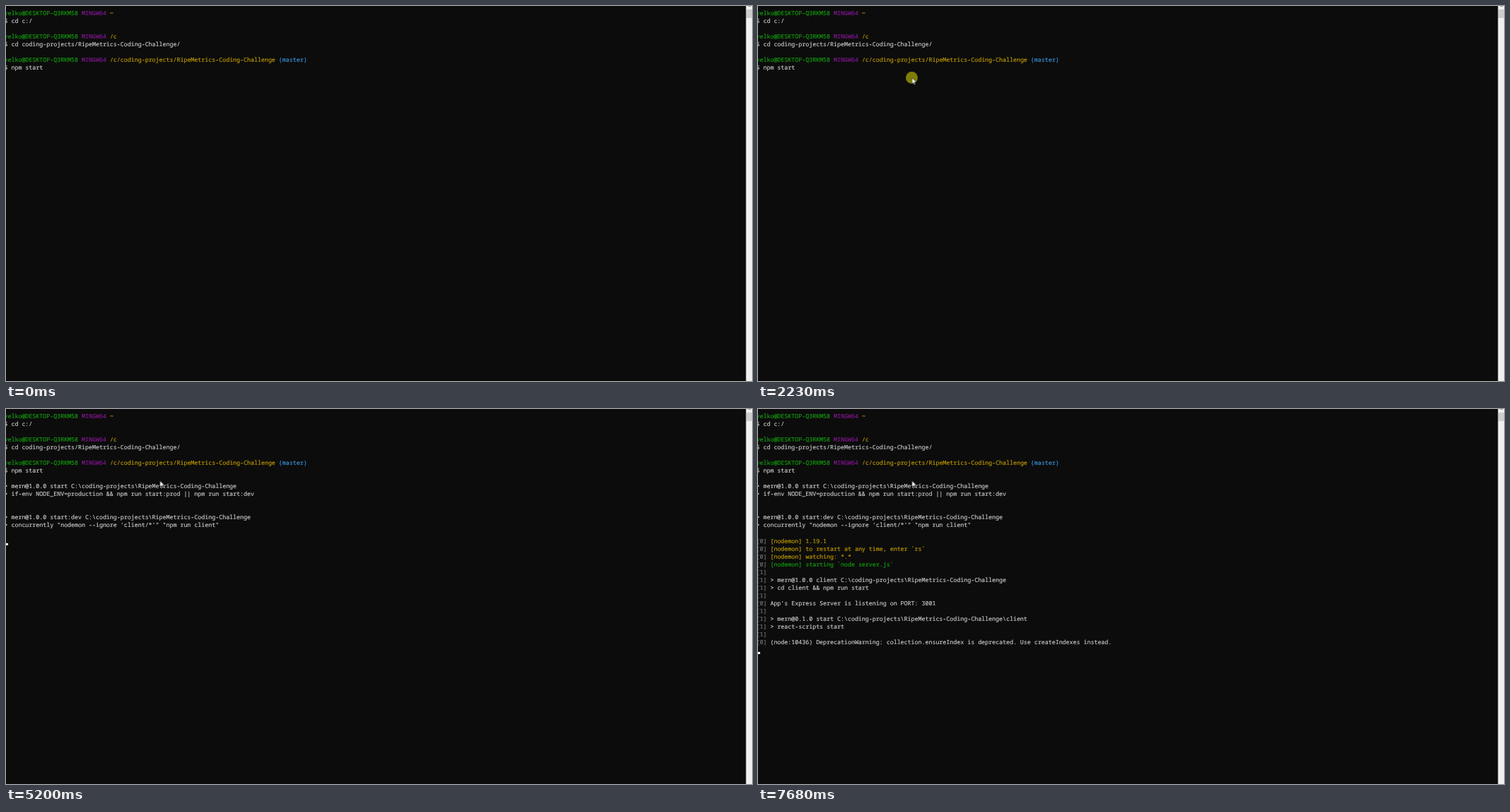
Animation, 1055 px wide and 531 px high, one loop 8000 ms. Source, as an HTML page:

```html
<!DOCTYPE html>
<html lang="en">
<head>
<meta charset="utf-8">
<title>Terminal</title>
<style>
  html, body { margin: 0; width: 100%; height: 100%; overflow: hidden; background: #0c0c0c; }
  body { position: relative; }

  #term {
    position: absolute; left: -2.5px; top: 4.8px;
    font: 8.3px/11.05px "Noto Sans Mono", monospace;
    text-rendering: geometricPrecision;
    -webkit-text-stroke: .15px;
    color: #ccc;
  }
  #term > div { white-space: pre; }
  .script { padding: 11.05px 0; }
  .g { color: #13a10e; }
  .m { color: #881798; }
  .y { color: #c19c00; }
  .b { color: #3a96dd; }
  .d { color: #767676; }

  .out, #caret, #click { animation: 8s step-end infinite; }
  .at4500 { animation-name: at4500; }
  .at5200 { animation-name: at5200; }
  .at5910 { animation-name: at5910; }
  .at6230 { animation-name: at6230; }
  .at6610 { animation-name: at6610; }
  .at6920 { animation-name: at6920; }
  .at7680 { animation-name: at7680; }
  @keyframes at4500 { 0% { opacity: 0 } 56.25%, 100% { opacity: 1 } }
  @keyframes at5200 { 0% { opacity: 0 } 65%, 100% { opacity: 1 } }
  @keyframes at5910 { 0% { opacity: 0 } 73.875%, 100% { opacity: 1 } }
  @keyframes at6230 { 0% { opacity: 0 } 77.875%, 100% { opacity: 1 } }
  @keyframes at6610 { 0% { opacity: 0 } 82.625%, 100% { opacity: 1 } }
  @keyframes at6920 { 0% { opacity: 0 } 86.5%, 100% { opacity: 1 } }
  @keyframes at7680 { 0% { opacity: 0 } 96%, 100% { opacity: 1 } }

  /* 1em is one terminal row */
  #caret {
    position: absolute; margin-top: 12.85px;
    width: 5px; height: 2.76px; font-size: 11.05px;
    background: #fff;
    animation-name: caret;
  }
  @keyframes caret {
    0%      { left: 52.3px; top: 7em; opacity: 0 }
    34.75%  { left: 52.3px; top: 7em; opacity: 1 }
    41.625% { left: 52.3px; top: 7em; opacity: 0 }
    46.375% { left: -2.4px; top: 8em; opacity: 1 }
    47.5%   { left: -2.4px; top: 8em; opacity: 0 }
    54.375% { left: -2.4px; top: 8em; opacity: 1 }
    56.25%  { left: -2.4px; top: 12em; opacity: 1 }
    65%     { left: -2.4px; top: 16em; opacity: 1 }
    73.875% { left: -2.4px; top: 20em; opacity: 1 }
    77.875% { left: -2.4px; top: 24em; opacity: 1 }
    82.625% { left: -2.4px; top: 24em; opacity: 0 }
    83.625% { left: -2.4px; top: 25em; opacity: 1 }
    86.5%   { left: -2.4px; top: 29em; opacity: 1 }
    94.125% { left: -2.4px; top: 29em; opacity: 0 }
    96%, 100% { left: -2.4px; top: 30em; opacity: 1 }
  }

  #click {
    position: absolute; left: 209px; top: 93px; width: 17px; height: 17px;
    border-radius: 50%; background: rgba(255, 255, 0, .47);
    animation-name: click;
  }
  @keyframes click {
    0% { opacity: 0 }
    27.875% { opacity: 1 }
    30.75%, 100% { opacity: 0 }
  }

  #mouse {
    position: absolute; left: 0; top: 0; width: 12px; height: 20px;
    overflow: visible;
    animation: mouse 8s step-end infinite;
  }
  @keyframes mouse {
    0%        { transform: translate(625px, 435px); opacity: 0 }
    4.75%     { transform: translate(625px, 435px); opacity: 1; animation-timing-function: steps(6, end) }
    10.5%     { transform: translate(471px, 292px); opacity: 1 }
    16.25%    { transform: translate(471px, 292px); opacity: 1; animation-timing-function: steps(3, start) }
    19.0625%  { transform: translate(237px, 187.6px); opacity: 1 }
    20.25%    { transform: translate(237px, 187.6px); opacity: 1; animation-timing-function: steps(4, start) }
    24.0833%, 100% { transform: translate(217.5px, 101.3px); opacity: 1 }
  }

  #bar { position: absolute; right: 0; top: 0; width: 8px; height: 100%; background: #f0f0f0; border-left: 1px solid #7e7e7e; }
  #bar::before { content: ""; position: absolute; left: 0; top: 5px; width: 8px; height: 12px; background: #cdcdcd; }
  #bar::after { content: ""; position: absolute; left: 3px; top: 0; width: 3px; height: 1px; background: #888; }
</style>
</head>
<body>
<div id="term">
<div><span class="g">velko@DESKTOP-Q3RKM58</span> <span class="m">MINGW64</span> <span class="y">~</span>
$ cd c:/

<span class="g">velko@DESKTOP-Q3RKM58</span> <span class="m">MINGW64</span> <span class="y">/c</span>
$ cd coding-projects/RipeMetrics-Coding-Challenge/

<span class="g">velko@DESKTOP-Q3RKM58</span> <span class="m">MINGW64</span> <span class="y">/c/coding-projects/RipeMetrics-Coding-Challenge</span> <span class="b">(master)</span>
$ npm start</div>
<div class="out at4500 script">&gt; mern@1.0.0 start C:\coding-projects\RipeMetrics-Coding-Challenge
&gt; if-env NODE_ENV=production &amp;&amp; npm run start:prod || npm run start:dev</div>
<div class="out at5200 script">&gt; mern@1.0.0 start:dev C:\coding-projects\RipeMetrics-Coding-Challenge
&gt; concurrently "nodemon --ignore 'client/*'" "npm run client"</div>
<div class="out at5910"><span class="d">[0]</span> <span class="y">[nodemon] 1.19.1</span>
<span class="d">[0]</span> <span class="y">[nodemon] to restart at any time, enter `rs`</span>
<span class="d">[0]</span> <span class="y">[nodemon] watching: *.*</span>
<span class="d">[0]</span> <span class="g">[nodemon] starting `node server.js`</span></div>
<div class="out at6230"><span class="d">[1]</span>
<span class="d">[1]</span> &gt; mern@1.0.0 client C:\coding-projects\RipeMetrics-Coding-Challenge
<span class="d">[1]</span> &gt; cd client &amp;&amp; npm run start
<span class="d">[1]</span></div>
<div class="out at6610"><span class="d">[0]</span> App's Express Server is listening on PORT: 3001</div>
<div class="out at6920"><span class="d">[1]</span>
<span class="d">[1]</span> &gt; mern@0.1.0 start C:\coding-projects\RipeMetrics-Coding-Challenge\client
<span class="d">[1]</span> &gt; react-scripts start
<span class="d">[1]</span></div>
<div class="out at7680"><span class="d">[0]</span> (node:10436) DeprecationWarning: collection.ensureIndex is deprecated. Use createIndexes instead.</div>
</div>
<div id="caret"></div>
<div id="bar"></div>
<div id="click"></div>
<svg id="mouse" viewBox="0 0 12 20">
  <path transform="scale(.5524)" d="M.5 .5V16.5L4.2 13L6.8 18.8L9.2 17.8L6.7 12H11.8Z" fill="#fff" stroke="#000"/>
</svg>
</body>
</html>
```
